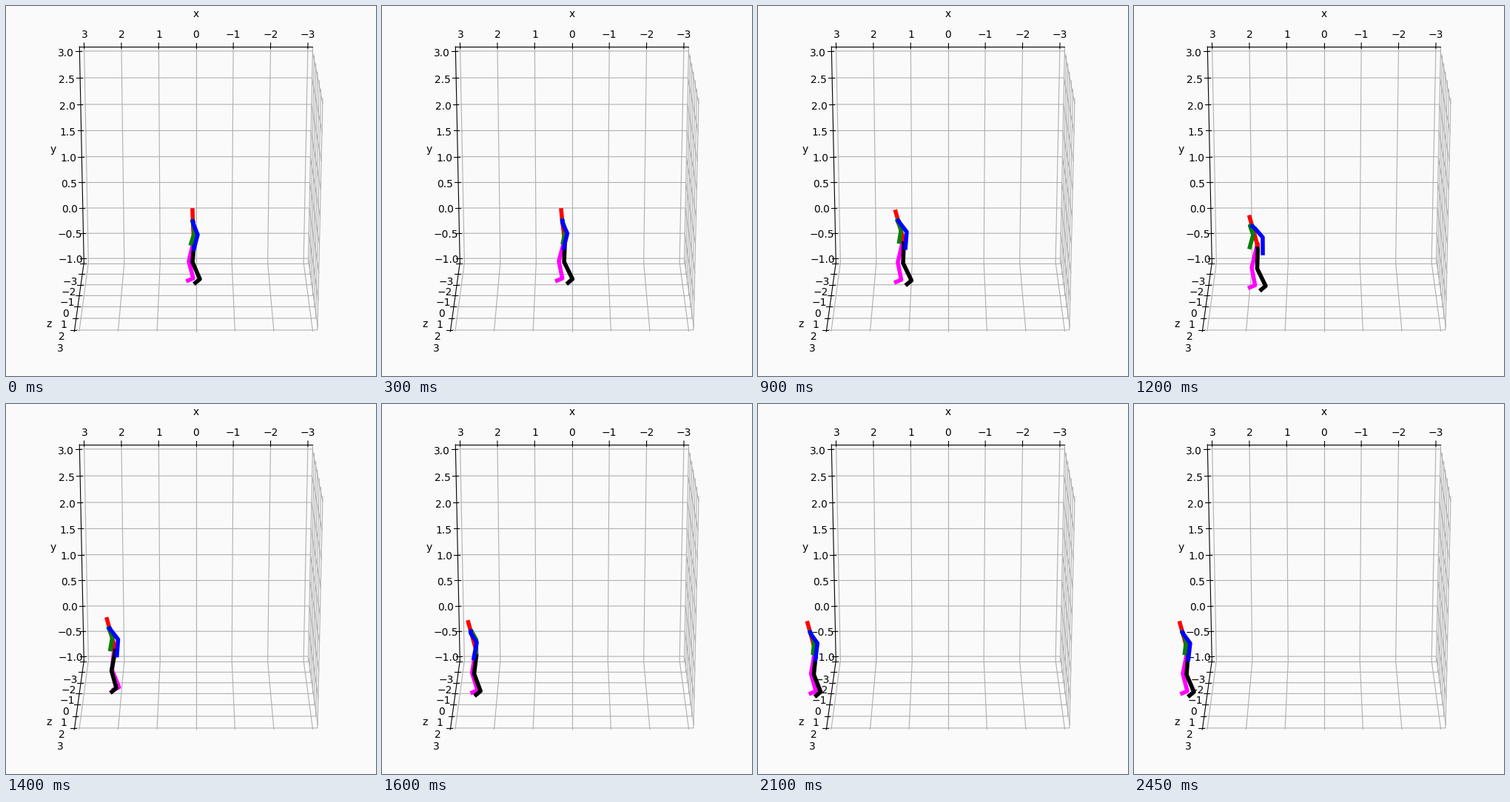
A matplotlib script that plays this animation: 500 px wide and 500 px high, repeating every 2500 ms.

```python
import numpy as np
import matplotlib.pyplot as plt
from matplotlib.animation import FuncAnimation

SIZE, FRAMES, STEP = 500, 50, 50
LOOP = FRAMES * STEP / 1000
BACKGROUND = "#fafafa"

# Standing pose: joint offsets from the head in stage pixels, y down.
SPINE = [(0, 0), (0.5, 15), (2, 42)]                  # head, neck, root
FAR_ARM = [(0, 14), (3, 29), (-2, 45)]                # shoulder, elbow, wrist
NEAR_ARM = [(1, 18), (7, 33), (2, 52)]
FAR_LEG = [(1, 44), (-5, 69), (1, 92), (-6, 95)]      # hip, knee, ankle, toe
NEAR_LEG = [(2, 48), (0, 70), (10, 93), (4, 98)]

ARM_SHARE = [0.35, 0.6, 1]
LEG_SHARE = [0, 0.45, 1, 1]


def ease(s):
    s = np.clip(s, 0, 1)
    return s * s * (3 - 2 * s)


def head_at(t):
    """Slow start, steady walk, halt; the path also nears the viewer."""
    x = np.interp(t, [0, 0.55, 0.9, 2.1, 2.45], [252, 234, 186, 67, 62])
    return np.array([x, 276 + 20 * ease((t - 0.7) / 1.05)])


def limb(pose, t, swing=0):
    """Place a limb: lean into the walk, crouch a little, then swing."""
    joints = np.array(pose, float)
    drop = joints[:, 1].copy()
    walk = ease(t / 0.8)
    joints[:, 0] += 9 * walk * np.minimum(drop / 45, 1) + swing
    joints[:, 1] -= walk * np.interp(drop, [0, 35, 72], [0, 6, 0])
    return joints + head_at(t)


def skeleton(t):
    """Colour and joints of each chain, in drawing order."""
    effort = np.sin(np.pi * t / LOOP)
    arm = -7 * effort * np.cos(2 * np.pi * (t - 1.15) / 1.3) * np.array(ARM_SHARE)
    leg = 7 * effort * np.sin(2 * np.pi * (t - 0.85) / 0.8) * np.array(LEG_SHARE)
    spine = limb(SPINE, t)
    neck, root = spine[1], spine[2]
    return {
        "magenta": np.vstack([root, limb(FAR_LEG, t, -leg)]),
        "black": np.vstack([root, limb(NEAR_LEG, t, leg)]),
        "red": spine,
        "green": np.vstack([neck, limb(FAR_ARM, t, arm)]),
        "blue": np.vstack([neck, limb(NEAR_ARM, t, -arm)]),
    }


def padded(a, b):
    pad = (b - a) / 48
    return a - pad, b + pad


fig = plt.figure(figsize=(SIZE / 100, SIZE / 100), dpi=100,
                 facecolor=BACKGROUND)

room = fig.add_axes([0, 0, 1, 1], projection="3d", facecolor="none")
room.set_xlim(*padded(3, -3))
room.set_ylim(*padded(-1, 3))
room.set_zlim(*padded(-3, 3))
room.set_xticks(range(-3, 4))
room.set_yticks(np.arange(-1, 3.1, 0.5))
room.set_zticks(range(-3, 4))
room.set_xlabel("x", labelpad=1.4)
room.set_ylabel("y")
room.set_zlabel("z")
for axis in (room.xaxis, room.yaxis, room.zaxis):
    axis.set_pane_color((1, 1, 1, 0))
# A hair of azimuth keeps the side wall on the right, yet lines still snap.
room.view_init(elev=110, azim=-90 + 1e-7)

stage = fig.add_axes([0, 0, 1, 1])
stage.set_xlim(0, SIZE)
stage.set_ylim(SIZE, 0)
stage.axis("off")
lines = {color: stage.plot([], [], color=color, lw=4)[0]
         for color in skeleton(0)}


def draw(frame):
    for color, joints in skeleton(frame * STEP / 1000).items():
        lines[color].set_data(joints[:, 0], joints[:, 1])
    return list(lines.values())


anim = FuncAnimation(fig, draw, frames=FRAMES, interval=STEP,
                     repeat=True, repeat_delay=0, blit=False)
plt.show()
```
